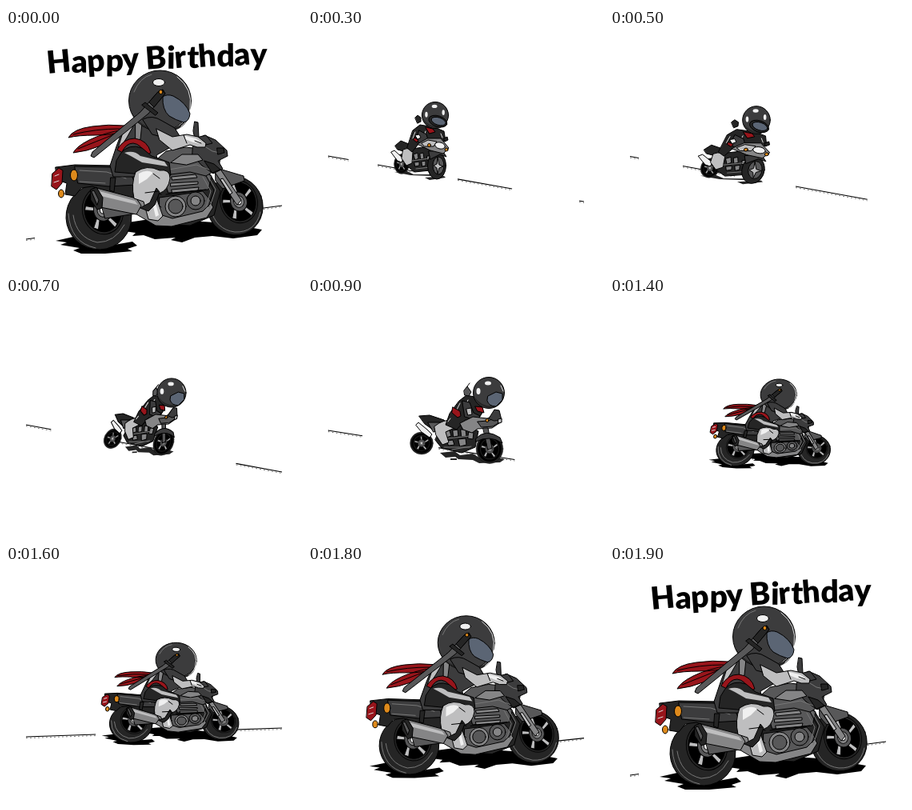
These frames come from a looping animation (370 by 300 pixels, 2000 ms). An HTML page:

```html
<!DOCTYPE html>
<html lang="en">
<head>
<meta charset="utf-8">
<title>Birthday ride</title>
<style>
html, body { margin: 0; width: 100%; height: 100%; overflow: hidden; background: #fff; }
svg { display: block; width: 370px; height: 300px; }
text { font: 900 39px Lato, "Open Sans", sans-serif; fill: #000; }
.ink * { stroke: #000; stroke-width: 1; stroke-linejoin: round; stroke-linecap: round; vector-effect: non-scaling-stroke; }
.b { fill: #000; } .k { fill: #252525; } .d { fill: #3c3c3d; } .g { fill: #585859; } .m { fill: #858586; }
.l { fill: #bebebf; } .w { fill: #f0f0f0; } .r { fill: #98151b; } .o { fill: #de8a1c; } .v { fill: #5b6574; }
.n { fill: none; }
.ink .plain { stroke: none; }
.ink .shine { fill: none; stroke: #ddd; }
.ink .soft { fill: none; stroke: #777; }
</style>
</head>
<body>
<svg viewBox="0 0 370 300">
  <defs>
    <g id="rim">
      <circle r="29" class="k"/>
      <circle r="26" class="soft"/>
      <path class="l" d="M-2-10L-4-24H1L2-10ZM9-5L22-14 24-9 10-1ZM7 8L17 19 13 23 3 10ZM-6 9L-11 22-17 19-9 6ZM-11-1L-25-4-23-9-10-5Z"/>
      <circle r="13" class="g"/>
      <circle r="8" class="m"/>
      <circle r="4" class="w"/>
    </g>
    <g id="wheel">
      <circle r="40" class="k"/>
      <circle r="35" class="soft"/>
      <use href="#rim"/>
    </g>
  </defs>

  <text id="title" transform="translate(52 57) rotate(-2.4)" rotate="-3 2 -2 3 -2 0 -2 3 -3 3 -2 2 -3 2">Happy Birthday</text>
  <path id="road" fill="none" stroke="#000" stroke-width="1.1"/>
  <path id="grit" fill="none" stroke="#000" stroke-width=".5" stroke-dasharray="2 3"/>

  <g id="front" class="ink">
    <path class="k plain" d="M108 180l16-1 8 4 20 0 4 2-28-1ZM146 187l24-2 2 2-20 3Z"/>
    <use href="#wheel" transform="translate(117 170) scale(.24 .31)"/>
    <path class="k" d="M109 147l7-6 10 4 8 6-8 5-14-4Z"/>
    <path class="w" d="M104 155l4-2 11 10-2 5-5-2Z"/>
    <path class="k" d="M124 152l26-4 8 12-5 18-20 2-11-9Z"/>
    <path class="l" d="M119 152q9-4 12 3l-1 14-7 3-6-9Z"/>
    <path class="m" d="M132 158l5-2 1 7-4 2ZM140 157l4-1 1 7-4 1ZM133 168l6-1 0 5-5 1ZM142 167l5-1 0 6-4 1ZM149 160l4 0 0 5-4 0Z"/>
    <path class="soft" d="M130 166l22-3M135 176l18-2"/>
    <ellipse class="k" cx="161" cy="172" rx="11.5" ry="17"/>
    <ellipse class="g" cx="163" cy="172" rx="7" ry="11"/>
    <path class="l" d="M162 162l2 9 5 2-5 2-2 7-1-7-4-3 4-2Z"/>
    <path class="d" d="M151 154l17-1 5 8-8-3-12 6Z"/>
    <path class="k" d="M131 128l9-7 18 3 12 5 2 12-15 5-18-2-9 11-6-5Z"/>
    <path class="shine" d="M134 130l-3 8M147 129l-2 6M166 132l2 5"/>
    <path class="d" d="M139 128l9 5 3 10-7 4-9-7Z"/>
    <path class="r" d="M147 124l9 2 3 4-7 2ZM133 137l5 3-2 3-4-3Z"/>
    <path class="m" d="M137 145l12-7 17 0 10 12-7 7-16-4Z"/>
    <path class="l" d="M142 144l8-4 11 2-4 6-11 0Z"/>
    <ellipse class="w" cx="165" cy="147" rx="6.5" ry="4" transform="rotate(15 165 147)"/>
    <circle class="o" cx="151.500" cy="146.500" r="2"/>
    <circle class="o" cx="173" cy="152" r="2"/>
    <path class="k" d="M170 138l4-2 1 4-4 2ZM134 112l3-3 4 3 0 5-4 2Z"/>
    <path class="w" d="M134 134l5-1 2 4-4 2Z"/>
  </g>

  <g id="quarter" class="ink">
    <path class="k plain" d="M165 196l18-2 7 5 16-2 8 5 22 0 10 2-6 4-26 1-8-4-18-1-4-3-12 1ZM178 203l8 0 0 2-8 0Z"/>
    <use href="#wheel" transform="translate(142 184) scale(.36 .35)"/>
    <use href="#wheel" transform="translate(227 191) scale(.42 .46)"/>
    <path class="k" d="M139 150l13-1 18 6 6 8-20 4-10-7Z"/>
    <path class="g" d="M150 158l16 0 3 8-12 4Z"/>
    <path class="k" d="M166 165l31-5 16 9-4 20-17 7-25-6-8-10Z"/>
    <path class="m" d="M171 170l6-2 2 7-6 2ZM181 168l6-1 1 8-6 1ZM191 167l6 0 1 8-6 1ZM173 181l8-1 2 6-7 1ZM188 179l9-1 1 8-8 2ZM201 170l6 1-1 8-6-1Z"/>
    <path class="soft" d="M166 179l36-4M170 189l32 0M180 192l24-4"/>
    <path class="w" d="M135 161l3-3 11 9 6 6-3 4-10-7Z"/>
    <path class="l" d="M158 163q12-10 24-7l3 8-13 6 4 13-8 3-8-12Z"/>
    <path class="k" d="M189 131l9-7 15 3 6 17-6 10-17 1-10 12-14-6 5-14Z"/>
    <path class="shine" d="M190 134l-5 10M200 130l-3 7M178 153l-3 4"/>
    <path class="r" d="M181 139l9 5 1 6-4 2-7-6ZM209 138l9 1 2 7-8-2Z"/>
    <path class="d" d="M193 131l9 2 5 13 8 4-5 5-14-4Z"/>
    <path class="m" d="M190 159l16-8 18 2 14-5 4 9-12 8-18 1-7 5-11-4Z"/>
    <path class="g" d="M212 157l13-1 13-5 3 6-10 6-14 1Z"/>
    <path class="d" d="M226 153l7-11 6 1 3 12-9 1Z"/>
    <path class="l" d="M198 141l6-1 1 8-5 1ZM238 154l4-1 0 5-4 1Z"/>
    <circle class="o" cx="224" cy="155.500" r="2"/>
    <path class="g" d="M219 165l6 0 5 25-5 2Z"/>
    <path class="d" d="M210 178q12-13 30-1l3 7q-16-11-33-2Z"/>
    <path class="g" d="M195 118l4-5 5 7-3 5-5-1Z"/>
    <path class="n" d="M199 113l3-4"/>
  </g>

  <g id="side" class="ink">
    <path class="b plain" d="M62 266l22-5 40 12 34-6 6 5-12 4 6 3-34 3-30 0-10-4 8-3-24-4 8-3ZM146 244l40-6 60 4 30 2 44 8-6 7-30 4-26-3-22 2-16 6-14-3 6-3-26 2-14-5-14 1 4-4-14-2Z"/>
    <ellipse class="k" cx="286" cy="222" rx="35" ry="37" transform="rotate(-20 286 222)"/>
    <path class="soft" d="M256 226q6 26 30 29 26 1 32-25"/>
    <use href="#rim" transform="translate(291 217) rotate(-16) scale(.8 .93)"/>
    <path class="g" d="M262 180l8-3 27 8 1 6-14 5-13 5-9-10Z"/>
    <path class="m" d="M260 178l7-3 27 40-5 6Z"/>
    <path class="l" d="M268 189l3-1 12 18-3 2Z"/>
    <ellipse class="k" cx="116" cy="236" rx="41" ry="41" transform="rotate(-25 116 236)"/>
    <path class="soft" d="M78 232q2 36 34 43M84 234q4 28 30 34 22 0 34-22"/>
    <use href="#rim" transform="translate(121 228) rotate(-10) scale(.88 1.03)"/>
    <path class="g" d="M120 223l58-6 4 12-58 9Z"/>
    <path class="k" d="M62 174l24-3 50 1 32 6 16 16-10 20-34-4-32-12-14 2-8 10-12-2 2-14-12-4Z"/>
    <path class="d" d="M86 173l44 1 26 8 6 14-34 2-38-4Z"/>
    <path class="soft" d="M92 178l34 2 24 8M92 192l32 2"/>
    <path class="r" d="M58 182l8-7 5 3-1 16-7 8-6-4Z"/>
    <path class="shine" d="M61 185l5-2M60 193l6-2"/>
    <ellipse class="o" cx="85" cy="184" rx="4.500" ry="7"/>
    <ellipse class="o" cx="69" cy="207" rx="3.500" ry="5"/>
    <path class="k" d="M160 190l92-12 16 26-8 30-30 13-40-2-30-22Z"/>
    <path class="g" d="M196 182l48-6 13 9-4 17-50 4Z"/>
    <path class="m" d="M207 186l30-3 2 4-31 3ZM206 194l34-2 0 3-34 3ZM207 202l34-3-1 4-32 3Z"/>
    <path class="g" d="M192 212l54-8 12 14-10 18-40 6-16-10Z"/>
    <circle class="m" cx="212" cy="223" r="13"/>
    <circle class="g" cx="212" cy="223" r="9"/>
    <circle class="g" cx="237" cy="216" r="11"/>
    <circle class="m" cx="237" cy="216" r="6"/>
    <path class="m" d="M158 214l10-2 24 21 16 5 38-9 10-10 3 5-8 13-44 11-20-1-32-19Z"/>
    <path class="soft" d="M246 186l10 18-6 20M252 184l10 18-8 24"/>
    <path class="n" d="M250 185l10 18-7 20M166 200l28 24M172 196l22 12M200 208l50-6"/>
    <path class="m" d="M113 200l50 13 6 9-6 11-45-9Z"/>
    <path class="l plain" d="M117 204l44 12 4 5-46-11Z"/>
    <path class="k" d="M106 202l7-3 8 13-1 13-6 2-8-12Z"/>
    <path class="g" d="M107 204l3-1 6 12-2 6Z"/>
    <path class="k" d="M131 187l6 0-2 18-5-2Z"/>
    <path class="g" d="M182 170l18-16 24-5 20 2 24 10-2 14-16 10-20-5-32 4Z"/>
    <path class="d" d="M234 142l14-8 14 6 14 13 1 7-12 6 6 10-12 6-14-10-12-13Z"/>
    <path class="m" d="M206 168l14-10 20 0 6 7-20 6Z"/>
    <path class="soft" d="M204 177l34-6 16 6M242 144l16 10 14 3"/>
    <path class="k" d="M264 150l8 0 1 6-8 2ZM248 166l12 4 8 7-10 4Z"/>
    <path class="d" d="M236 117l4 1 1 18-5 3-2-10ZM238 137l12-3 8 10-12 3Z"/>
    <path class="r" d="M148 122q-20-2-40 1-24 3-30 14 12-3 34-3 22 0 34-5ZM148 127q-26 4-44 13-16 8-20 16 18-2 32-8 18-8 31-17Z"/>
    <path class="n" d="M84 133q28-7 58-7M90 151q20-8 50-20"/>
    <path class="d" d="M148 122l18-13 34 8 12 14-6 18-18 10 4 20-20 7-38 0-4-14 8-24Z"/>
    <path class="l" d="M148 122l10-6 2 5-9 16-9 14-2-1 5-16Z"/>
    <path class="m" d="M162 116l8 3-2 20-6 3Z"/>
    <path class="r" d="M139 152q8-14 22-14 16 2 20 18l-6 3q-6-14-16-15-9 0-14 11Z"/>
    <path class="k" d="M144 156q10-12 26-6l12 10 22 8 2 16-16 4-30-6-24-2 2-14Z"/>
    <path class="l plain" d="M148 156q12-4 20 4l30 7 4 6-32-5-14-8Z"/>
    <path class="l" d="M162 180q14-10 30-2 13-2 13 10-2 15-14 19l-2 8 7 20-6 6-12-2-6-22-12-4q-4-18 2-33Z"/>
    <path class="w plain" d="M166 182q10-6 18-1l-8 8-10 6ZM182 214l4 1 5 19-4 2Z"/>
    <path class="k" d="M180 218l8-18 4 5-6 16-8 8-10-4Z"/>
    <path class="n" d="M174 206l16-2M184 182l8 6"/>
    <ellipse class="d" cx="192.500" cy="91" rx="39" ry="38"/>
    <path class="k plain" d="M156 102q9 23 39 25 26 0 35-22-4 24-32 25-34-2-42-28Z"/>
    <ellipse class="w" cx="191" cy="68" rx="7.500" ry="4.500"/>
    <path class="soft" d="M160 80q7-18 22-22M164 108q13 12 30 13"/>
    <path class="shine" d="M214 61q20 15 16 40-2 16-11 22"/>
    <path id="visor" class="v" d="M196 86q5-4 13-1 16 8 21 22-1 10-8 11-10-3-18-8-9-8-8-24Z"/>
    <path class="g" d="M190 80l6-3 3 5-21 25-68 55-4-2 2-5 60-50Z"/>
    <path class="k" d="M170 96l4-3 16 13-3 3ZM190 80l6-3 3 5-14 17-6-6Z"/>
    <circle class="o" cx="193.500" cy="80" r="2.500"/>
    <path class="d" d="M171 114q12-6 24 2l16 9 6 10-12 4-22-6Z"/>
    <path class="l" d="M188 126l20 10 18-3 14 3 10 8-1 5-10 0-9-3-22 7-16-13Z"/>
    <path class="w plain" d="M224 135l13 3 9 6-12-1-10-4Z"/>
    <path class="n" d="M222 134l4 10M236 141l8 3"/>
  </g>

  <g id="head" class="ink">
    <circle class="d" r="19.500"/>
    <path class="k plain" d="M-18 5Q-10 17 5 17L14 12 6 19Q-13 19-18 5Z"/>
    <g id="faceOn">
      <ellipse class="k" cx="4" cy="9" rx="14" ry="8" transform="rotate(18 4 9)"/>
      <ellipse class="v" cx="5" cy="9" rx="11" ry="5.500" transform="rotate(18 5 9)"/>
      <ellipse class="w plain" cx="-1" cy="-13" rx="4" ry="2.500"/>
      <ellipse class="w plain" cx="12" cy="-4" rx="2" ry="4"/>
      <ellipse class="w plain" cx="-13" cy="-1" rx="2" ry="4"/>
    </g>
    <g id="faceTurned">
      <path class="v" d="M-1 4L9-1 17 1 17 9 9 17Q0 17-2 10Z"/>
      <ellipse class="w plain" cx="-1" cy="-12" rx="4" ry="2.500"/>
      <ellipse class="w plain" cx="-13" cy="-2" rx="2.500" ry="4"/>
      <path class="shine" d="M15-9L18-2"/>
    </g>
  </g>
</svg>
<script>
const LOOP = 2000, STEP = 100, LEFT = 25, RIGHT = 345;
const el = id => document.getElementById(id);
const lerp = (a, b, t) => a + (b - a) * t;
const show = (id, on) => el(id).style.display = on ? "" : "none";

// pose: rear hub, front hub, helmet centre, helmet radius
// road: height at both ends, dash start, dash period, growth per dash
const keys = [
  { t: 300,  pose: [117, 170, 161, 172, 159, 109, 17],   road: [160, 217, 187, 152, 1.52] },
  { t: 700,  pose: [133, 180, 197, 183, 207, 121, 18.5], road: [161, 220, -5, 130, 1.25] },
  { t: 900,  pose: [142, 186, 227, 191, 226, 121, 20],   road: [168, 218, -217, 190, 1.001] },
  { t: 1200, pose: [156, 184, 244, 186, 209, 126, 18],   road: [193, 195, -572, 222, 1.001] },
  { t: 1600, pose: [155, 199, 270, 198, 213, 120, 25],   road: [216, 205, -1105, 270, 1.001] },
  { t: 1870, pose: [114, 235, 289, 221, 193, 91, 39],    road: [264, 222, -1315, 540, 1.001] }
];
const rest = { front: keys[0].pose, quarter: keys[2].pose, side: keys[5].pose };

function stateAt(time) {
  let i = 0;
  while (i < keys.length - 2 && time >= keys[i + 1].t) i++;
  const a = keys[i], b = keys[i + 1];
  const u = Math.min(1, (time - a.t) / (b.t - a.t));
  const mix = name => a[name].map((v, n) => lerp(v, b[name][n], u));
  return { pose: mix("pose"), road: mix("road") };
}

// affine map that carries one triangle of anchors onto another
function carry(from, to) {
  const [x, y, x1, y1, x2, y2] = from;
  const det = (x1 - x) * (y2 - y) - (x2 - x) * (y1 - y);
  const axis = n => {
    const p = to[n + 2] - to[n], q = to[n + 4] - to[n];
    const sx = (p * (y2 - y) - q * (y1 - y)) / det;
    const sy = (q * (x1 - x) - p * (x2 - x)) / det;
    return [sx, sy, to[n] - sx * x - sy * y];
  };
  const [a, c, e] = axis(0), [b, d, f] = axis(1);
  return `matrix(${[a, b, c, d, e, f]})`;
}

function roadPath([yl, yr, start, period, grow], drop) {
  const at = k => start + period * (grow ** k - 1) / (grow - 1);
  const y = x => lerp(yl, yr, (x - LEFT) / (RIGHT - LEFT)) + drop;
  let d = "";
  for (let k = -6; k < 14; k++) {
    const a = Math.max(LEFT, at(k)), b = Math.min(RIGHT, at(k + 0.5));
    if (a < b) d += `M${a} ${y(a)}L${b} ${y(b)}`;
  }
  return d;
}

function draw(now) {
  const time = Math.floor(now % LOOP / STEP) * STEP || LOOP - STEP;
  const { pose, road } = stateAt(time);
  const view = time <= 500 ? "front" : time <= 1000 ? "quarter" : "side";
  for (const name in rest) show(name, name === view);
  el(view).setAttribute("transform", carry(rest[view], pose));
  show("title", time === LOOP - STEP);
  show("visor", time >= 1800);
  show("head", view !== "side");
  show("faceOn", view === "front");
  show("faceTurned", view === "quarter");
  el("head").setAttribute("transform", `translate(${pose[4]} ${pose[5]}) scale(${pose[6] / 20})`);
  el("road").setAttribute("d", roadPath(road, 0));
  el("grit").setAttribute("d", roadPath(road, 1.6));
}

const begin = performance.now();
function tick() {
  draw(performance.now() - begin);
  requestAnimationFrame(tick);
}
tick();
</script>
</body>
</html>
```
